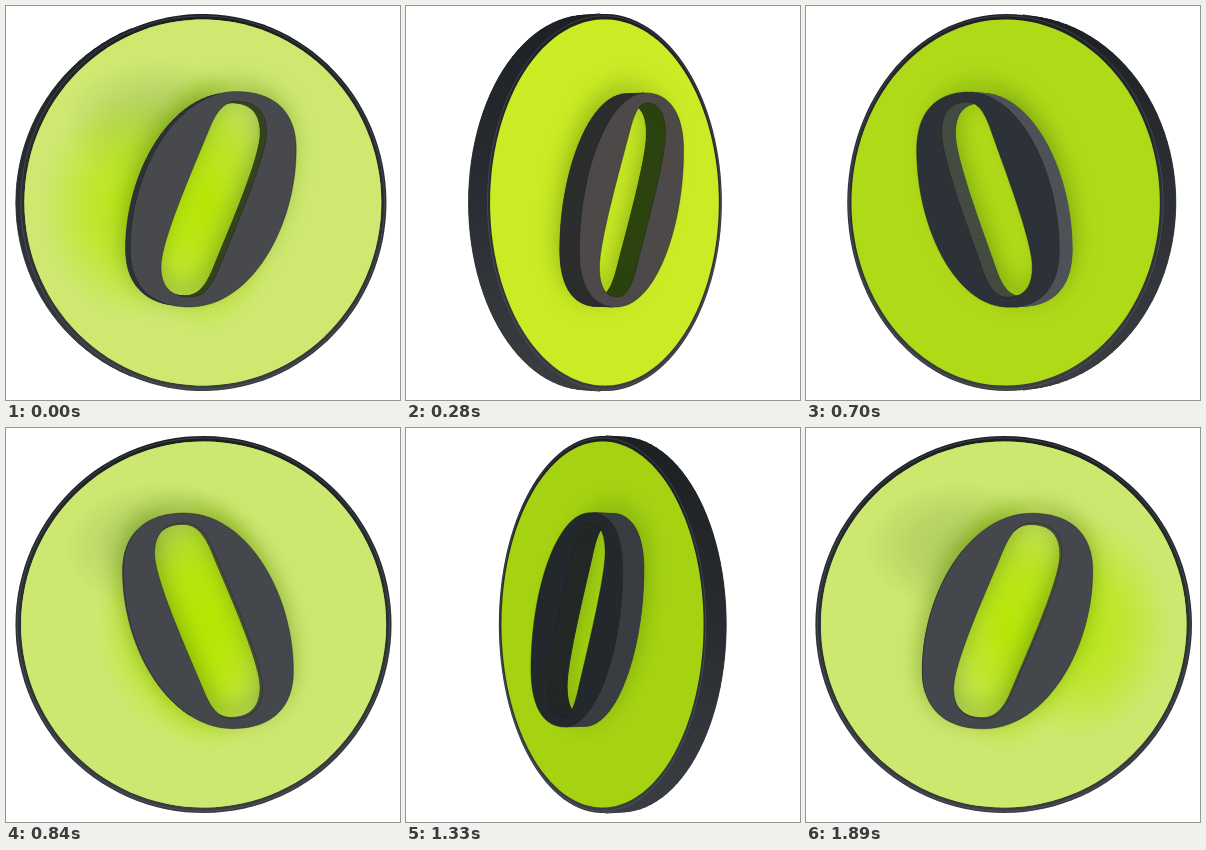
These frames come from a looping animation (394x394 px, 2.73 s). An HTML page with a canvas:

```html
<!DOCTYPE html>
<html lang="en">
<head>
<meta charset="utf-8">
<title>Turning zero coin</title>
<style>
html, body { margin: 0; width: 100%; height: 100%; overflow: hidden; background: #fff; }
canvas { display: block; width: 100vmin; height: 100vmin; }
</style>
</head>
<body>
<canvas id="stage" width="394" height="394"></canvas>
<script>
const ctx = document.getElementById('stage').getContext('2d');
const LOOP = 2730, STEP = 70, LAST = 27;
const CX = 198, CY = 196.5, CAMERA = 2000;
const RADIUS = 187.5, FACE = 182, HALF = 11, RELIEF = 24.5;

// Surface colours by the angle at which a side faces the viewer.
const LOOKS = [
  { at: -90, lime: '#94c40c', top: '#191d21', side: '#2c3034', hole: '#12170f', rim: '#222528' },
  { at: -67, lime: '#a0d010', top: '#1f2328', side: '#2f3338', hole: '#14191a', rim: '#26292c' },
  { at: -11, lime: '#b8e11d', top: '#363b43', side: '#626569', hole: '#626a58', rim: '#32363b' },
  { at: 3, lime: '#bfe63a', top: '#44474c', side: '#4a4d50', hole: '#4a5038', rim: '#2d3136' },
  { at: 14, lime: '#c2e63a', top: '#47494d', side: '#2c3034', hole: '#33421c', rim: '#2b2f34' },
  { at: 52, lime: '#cbeb25', top: '#4d4949', side: '#2c2d2d', hole: '#2c430f', rim: '#2a2e34' },
  { at: 77, lime: '#c3eb1d', top: '#444545', side: '#363b37', hole: '#2c322a', rim: '#272b2f' },
  { at: 90, lime: '#bfe81b', top: '#303334', side: '#3c4140', hole: '#2a2f2a', rim: '#26292d' }
];

const clamp = (v, lo, hi) => Math.min(hi, Math.max(lo, v));

function mix(a, b, f) {
  const channel = (hex, i) => parseInt(hex.substr(1 + 2 * i, 2), 16);
  return 'rgb(' + [0, 1, 2].map(i =>
    Math.round(channel(a, i) + (channel(b, i) - channel(a, i)) * f)).join(',') + ')';
}

function lookAt(deg) {
  let i = 0;
  while (i < LOOKS.length - 2 && LOOKS[i + 1].at < deg) i++;
  const a = LOOKS[i], b = LOOKS[i + 1], f = clamp((deg - a.at) / (b.at - a.at), 0, 1);
  const look = {};
  for (const key of ['lime', 'top', 'side', 'hole', 'rim']) look[key] = mix(a[key], b[key], f);
  return look;
}

function circle(r) {
  return Array.from({ length: 120 }, (_, i) => {
    const t = i * Math.PI / 60;
    return [r * Math.sin(t), -r * Math.cos(t)];
  });
}

// Half an outline as cubic curves; the other half is its point reflection.
function zeroOutline(curves) {
  const half = [];
  for (const [p, q, r, s] of curves) {
    for (let i = 0; i < 28; i++) {
      const t = i / 28, u = 1 - t;
      half.push([0, 1].map(k => 0.985 *
        (u * u * u * p[k] + 3 * u * u * t * q[k] + 3 * u * t * t * r[k] + t * t * t * s[k])));
    }
  }
  return half.concat(half.map(([x, y]) => [-x, -y]));
}

const OUTER = zeroOutline([
  [[24, -107.5], [62, -107.5], [85, -88], [85, -50]],
  [[85, -50], [85, 28], [38, 107.5], [-24, 107.5]]
]);
const INNER = zeroOutline([
  [[24, -97.5], [44, -97.5], [54, -87], [54, -67]],
  [[54, -67], [54, -40], [17, 40], [4, 72]],
  [[4, 72], [-3, 88], [-11, 97.5], [-24, 97.5]]
]);
const COIN = circle(RADIUS), LIP = circle(RADIUS - 2), DISC = circle(FACE);

function trace(points) {
  points.forEach(([x, y], i) => i ? ctx.lineTo(x, y) : ctx.moveTo(x, y));
  ctx.closePath();
}

function fill(color, ...outlines) {
  ctx.beginPath();
  outlines.forEach(trace);
  ctx.fillStyle = color;
  ctx.fill('evenodd');
}

// Draws those parts of a wall between two outlines that face the viewer.
function wall(front, base, color, sign) {
  ctx.beginPath();
  front.forEach((a, i) => {
    const j = (i + 1) % front.length, b = front[j];
    const cross = (b[0] - a[0]) * (base[i][1] - a[1]) - (b[1] - a[1]) * (base[i][0] - a[0]);
    if (cross * sign > 0) trace([a, b, base[j], base[i]]);
  });
  ctx.fillStyle = ctx.strokeStyle = color;
  ctx.lineWidth = 0.7;
  ctx.lineJoin = 'round';
  ctx.fill();
  ctx.stroke();
}

function glow(x, y, rx, ry, rgb, alpha) {
  ctx.save();
  ctx.translate(x, y);
  ctx.scale(rx, ry);
  const g = ctx.createRadialGradient(0, 0, 0, 0, 0, 1);
  g.addColorStop(0, `rgba(${rgb},${alpha})`);
  g.addColorStop(0.5, `rgba(${rgb},${alpha * 0.65})`);
  g.addColorStop(1, `rgba(${rgb},0)`);
  ctx.fillStyle = g;
  ctx.fillRect(-1, -1, 2, 2);
  ctx.restore();
}

function drawFace(face, look, deg) {
  fill(look.lime, face);
  ctx.save();
  ctx.beginPath();
  trace(face);
  ctx.clip();
  // Pale sheen and the reflection of the digit, seen only near head-on.
  const sheen = deg < 3 ? clamp((deg + 9) / 12, 0, 1) : clamp((36 - deg) / 22, 0, 1);
  if (sheen > 0) {
    ctx.fillStyle = `rgba(209,233,122,${0.85 * sheen})`;
    ctx.fillRect(0, 0, 394, 394);
    const slide = clamp(75 - 65 * (deg - 2.8), -70, 75);
    glow(CX - 45, CY - 78, 95, 65, '130,165,75', 0.42 * sheen);
    glow(CX + slide, CY + 3, 92, 112, '180,230,0', 0.85 * sheen);
    glow(CX + 3, CY, 72, 130, '182,230,0', 0.95 * sheen);
  }
  ctx.restore();
}

function rimPaint(color) {
  const g = ctx.createLinearGradient(0, CY - RADIUS, 0, CY + RADIUS);
  g.addColorStop(0, '#1d2023');
  g.addColorStop(0.5, color);
  g.addColorStop(1, '#3a3e42');
  return g;
}

function draw(theta) {
  const turn = ((theta + 90) % 360 + 360) % 360;
  const back = turn >= 180;
  const deg = turn % 180 - 90;
  const cos = Math.cos(deg * Math.PI / 180), sin = Math.sin(deg * Math.PI / 180);
  const project = (points, z, dx = 0, dy = 0) => points.map(([x, y]) => {
    const px = x + dx;
    const k = CAMERA / (CAMERA + px * sin - z * cos);
    return [CX + (px * cos + z * sin) * k, CY + (y + dy) * k];
  });
  const digit = (points, z) => {
    const shape = back ? points.map(([x, y]) => [-x, y]).reverse() : points;
    return project(shape, z, 2, -3.5);
  };
  const look = lookAt(deg);
  ctx.fillStyle = '#fff';
  ctx.fillRect(0, 0, 394, 394);

  const front = project(COIN, HALF), rear = project(COIN, -HALF);
  const rim = rimPaint(look.rim);
  fill(rim, rear);
  wall(front, rear, rim, -1);
  fill(rim, front);
  ctx.beginPath();
  trace(project(LIP, HALF));
  ctx.strokeStyle = 'rgba(105,112,120,.4)';
  ctx.lineWidth = 1;
  ctx.stroke();

  const face = project(DISC, HALF);
  drawFace(face, look, deg);

  const outer = digit(OUTER, HALF + RELIEF), outerBase = digit(OUTER, HALF);
  const inner = digit(INNER, HALF + RELIEF), innerBase = digit(INNER, HALF);
  ctx.save();
  ctx.beginPath();
  trace(face);
  ctx.clip();
  ctx.shadowColor = 'rgba(75,120,0,.6)';
  ctx.shadowBlur = 24;
  ctx.shadowOffsetY = -7;
  fill(look.side, outerBase, innerBase);
  ctx.restore();

  wall(inner, innerBase, look.hole, 1);
  wall(outer, outerBase, look.side, -1);
  fill(look.top, outer, inner);
  ctx.beginPath();
  trace(outer);
  trace(inner);
  ctx.strokeStyle = 'rgba(25,29,32,.4)';
  ctx.lineWidth = 1;
  ctx.stroke();
}

// A full turn that gains speed, then settles.
function angleAt(step) {
  const u = step - 12;
  return 184.2 + 18.5 * u - 0.0293 * u * u * u;
}

const start = performance.now();
let shown = -1;
function tick() {
  const time = (performance.now() - start) % LOOP;
  const step = Math.min(LAST, Math.floor(time / STEP));
  if (step !== shown) draw(angleAt(shown = step));
  requestAnimationFrame(tick);
}
tick();
</script>
</body>
</html>
```
